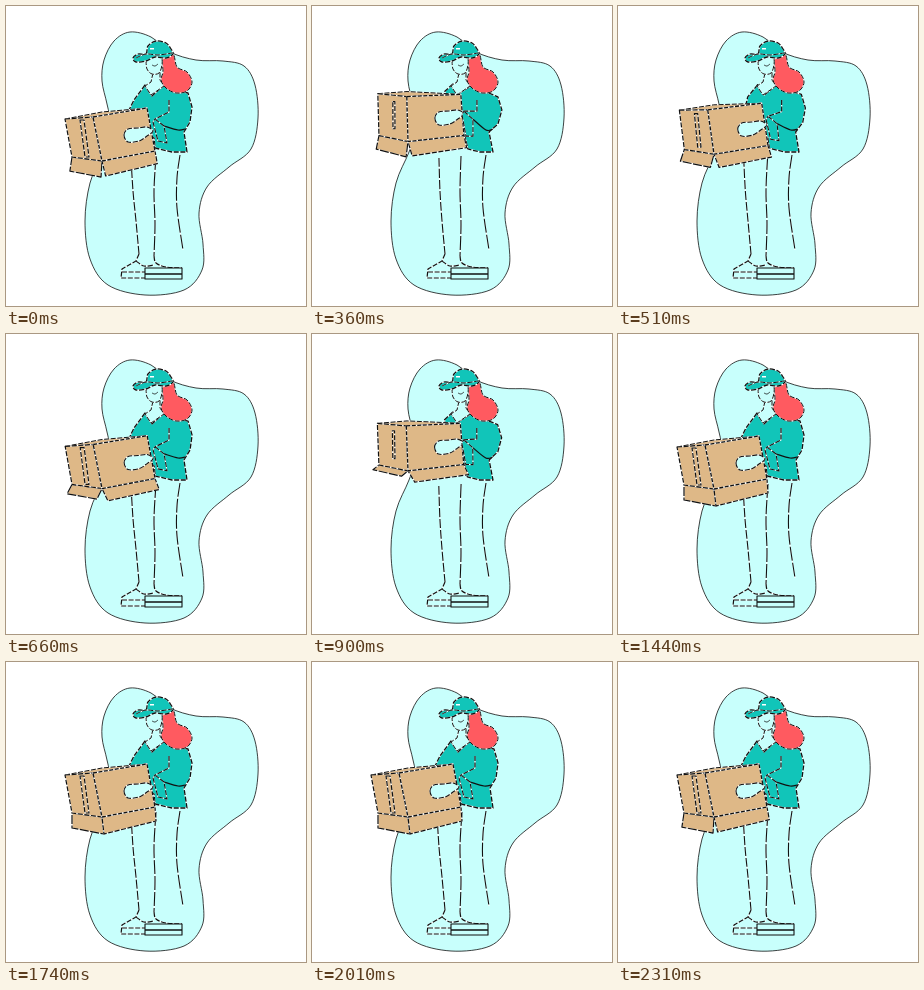
An HTML page with a canvas for the animation above (2.34 s loop, 300 px wide and 300 px high).

```html
<!DOCTYPE html>
<html lang="en">
<head>
<meta charset="utf-8">
<title>Shaking the box</title>
<style>
html, body { margin: 0; width: 100%; height: 100%; overflow: hidden; background: #fff; }
canvas { display: block; width: 300px; height: 300px; }
</style>
</head>
<body>
<canvas width="300" height="300"></canvas>
<script>
const ctx = document.querySelector('canvas').getContext('2d');
const LOOP = 2340;
const INK = '#111', PALE = '#c8fffc', TEAL = '#11c5b9', RED = '#ff5a60', CARD = '#deb887';
const DASH = [5, 1.6];

const mix = (a, b, k) => a + (b - a) * k;
const blend = (a, b, k) => a.map((p, i) => [mix(p[0], b[i][0], k), mix(p[1], b[i][1], k)]);
const shift = ([x, y], dx, dy) => [x + dx, y + dy];

// Eased value from [time, value] pairs
function track(keys, t) {
  let i = 1;
  while (i < keys.length - 1 && t > keys[i][0]) i++;
  const [t0, a] = keys[i - 1], [t1, b] = keys[i];
  const k = Math.min(1, Math.max(0, (t - t0) / (t1 - t0)));
  return mix(a, b, (1 - Math.cos(Math.PI * k)) / 2);
}

function poly(pts, closed) {
  const p = new Path2D();
  pts.forEach(([x, y], i) => i ? p.lineTo(x, y) : p.moveTo(x, y));
  if (closed) p.closePath();
  return p;
}

// Catmull-Rom curve through the points
function smooth(pts, closed) {
  const n = pts.length, p = new Path2D();
  const at = i => closed ? pts[(i + n) % n] : pts[Math.min(n - 1, Math.max(0, i))];
  p.moveTo(...pts[0]);
  for (let i = 0; i < (closed ? n : n - 1); i++) {
    const [a, b, c, d] = [at(i - 1), at(i), at(i + 1), at(i + 2)];
    p.bezierCurveTo(b[0] + (c[0] - a[0]) / 6, b[1] + (c[1] - a[1]) / 6,
      c[0] - (d[0] - b[0]) / 6, c[1] - (d[1] - b[1]) / 6, c[0], c[1]);
  }
  return p;
}

function paint(path, fill, width = 1.2, dash = DASH) {
  if (fill) { ctx.fillStyle = fill; ctx.fill(path); }
  if (!width) return;
  ctx.lineWidth = width;
  if (dash.length) {
    ctx.setLineDash([]);
    ctx.strokeStyle = '#fff';
    ctx.stroke(path);
  }
  ctx.setLineDash(dash);
  ctx.strokeStyle = INK;
  ctx.stroke(path);
}

const blob = smooth([[124, 26], [108, 35], [98, 54], [96, 75], [101, 98], [105, 121], [97, 146],
  [84, 177], [79, 215], [84, 253], [102, 279], [139, 289], [178, 284], [196, 264], [197, 238],
  [193, 207], [201, 181], [223, 161], [245, 143], [252, 112], [249, 79], [238, 60], [217, 55],
  [190, 54], [164, 46], [145, 31]], true);

const cap = smooth([[140, 48], [142, 40], [150, 35], [160, 37], [165, 43], [167, 48],
  [160, 52], [149, 51], [140, 55], [130, 56], [127, 52], [132, 48]], true);
const hair = smooth([[157, 52], [167, 48], [171, 61], [181, 66], [186, 76], [181, 85],
  [170, 87], [160, 82], [155, 74], [157, 66]], true);
const face = smooth([[140, 54], [141, 63], [146, 68], [153, 67], [156, 59], [156, 51]]);
const neck = poly([[147, 67], [145, 76], [139, 80], [145, 89], [158, 80], [154, 74], [154, 66]], true);

function legs(lift) {
  paint(smooth([[mix(125, 127, lift), 152], [mix(127, 128, lift), 185], [130, 215], [133, 248]]), null, 1.1, [9, 2]);
  paint(smooth([[mix(150, 149, lift), 150], [148, 185], [149, 218], [148, 250]]), null, 1.1, [14, 2]);
  paint(smooth([[174, 149], [171, 172], [171, 202], [177, 244]]), null, 1.1, [14, 2]);
  paint(poly([[133, 248], [130, 255], [116, 263], [115, 272], [139, 272]]), null);
  paint(smooth([[130, 255], [138, 260], [148, 259]]), null);
  paint(poly([[116, 266], [139, 266]]), null);
  paint(smooth([[148, 250], [150, 257], [160, 261], [176, 262]]), null);
  paint(poly([[139, 262], [176, 262], [176, 273], [139, 273]], true), PALE, 1.1, []);
  paint(poly([[139, 268], [176, 268]]), null, 1.6, []);
}

function head() {
  paint(neck, PALE, 1);
  paint(hair, RED, 1);
  paint(face, PALE, 1);
  paint(smooth([[146, 59], [149, 60], [152, 58]]), null, .8, []);
  paint(cap, TEAL, 1.3);
  paint(smooth([[130, 52], [140, 48], [152, 49], [166, 47]]), null, 1);
  ctx.fillStyle = '#fff';
  ctx.fillRect(144, 42, 4, 1.5);
}

const shirtDown = [[139, 79], [128, 94], [122, 106], [132, 122], [148, 132], [149, 142], [166, 146],
  [181, 146], [178, 126], [184, 116], [186, 101], [182, 87], [169, 84], [158, 79], [146, 90]];
const shirtUp = [[141, 78], [133, 85], [136, 99], [143, 116], [153, 130], [156, 143], [168, 146],
  [181, 146], [177, 126], [186, 118], [190, 104], [186, 91], [172, 85], [159, 80], [147, 87]];

const sleeveDown = [[163, 94], [163, 106], [149, 113], [158, 120], [161, 137], [152, 135], [147, 116]];
const sleeveUp = [[165, 94], [165, 105], [152, 105], [161, 113], [161, 130], [154, 130], [150, 108]];

function shirt(lift) {
  paint(poly(blend(shirtDown, shirtUp, lift), true), TEAL, 1.3);
}

function arm(lift) {
  const s = blend(sleeveDown, sleeveUp, lift);
  const hand = [[118, 129], [122, 123], [132, 122], [141, 121], [147, 125], [141, 130], [133, 135], [122, 136]];
  ctx.save();
  ctx.translate(5 * lift, -17.5 * lift);
  ctx.setLineDash([]);
  paint(smooth(hand, true), PALE, 1.1);
  ctx.restore();
  paint(poly(s.slice(2), true), TEAL, 1.1);
  paint(poly(s.slice(0, 3)), null, 1.2);
  paint(smooth([s[3], [mix(172, 174, lift), 124], [mix(179, 181, lift), 123]]), null, 1.2, []);
}

// Left top, front top, right top, right bottom, front bottom, left bottom, back top
const boxDown = [[59, 113], [87, 111], [141, 102], [149, 145], [96, 155], [66, 151], [96, 106]];
const boxUp = [[66, 87], [95, 90], [149, 88], [152, 129], [96, 135], [67, 129], [95, 85]];
const slotDown = [[74, 114], [78, 114], [83, 151], [79, 151]];
const slotUp = [[81, 95], [83, 95], [83, 122], [81, 122]];

function box(lift, open) {
  const [lt, ft, rt, rb, fb, lb, bt] = blend(boxDown, boxUp, lift);
  const s = Math.sin(1.25 * open), c = Math.cos(1.25 * open);
  paint(poly([lb, fb, shift(fb, 2 - 9 * s, 17 * c), shift(lb, -6.3 * s, 15 * c)], true), CARD, 1.2, [9, 1.5]);
  paint(poly([fb, rb, shift(rb, 1 + 4 * s, 14 - 4 * s), shift(fb, 2 + 5 * s, 17 - 6 * s)], true), CARD, 1.2);
  paint(poly([lt, bt, rt, ft], true), CARD, 1);
  paint(poly([lt, ft, fb, lb], true), CARD, 1.2);
  paint(poly([ft, rt, rb, fb], true), CARD, 1.3, [4, 1.5]);
  paint(poly(blend(slotDown, slotUp, lift), true), CARD, 1.2);
}

const liftKeys = [[0, 0], [330, 1], [630, 0], [930, .93], [1230, 0], [LOOP, 0]];
const openKeys = [[0, .27], [360, .36], [660, .72], [900, 1], [1400, 0], [2050, 0], [2310, .27], [LOOP, .27]];

function draw(now) {
  const t = now % LOOP;
  const lift = track(liftKeys, t), open = track(openKeys, t);
  ctx.setLineDash([]);
  ctx.lineJoin = 'round';
  ctx.fillStyle = '#fff';
  ctx.fillRect(0, 0, 300, 300);
  paint(blob, PALE, .8, []);
  legs(lift);
  shirt(lift);
  head();
  box(lift, open);
  arm(lift);
}

const start = performance.now();
function tick() {
  draw(performance.now() - start);
  requestAnimationFrame(tick);
}
tick();
</script>
</body>
</html>
```
